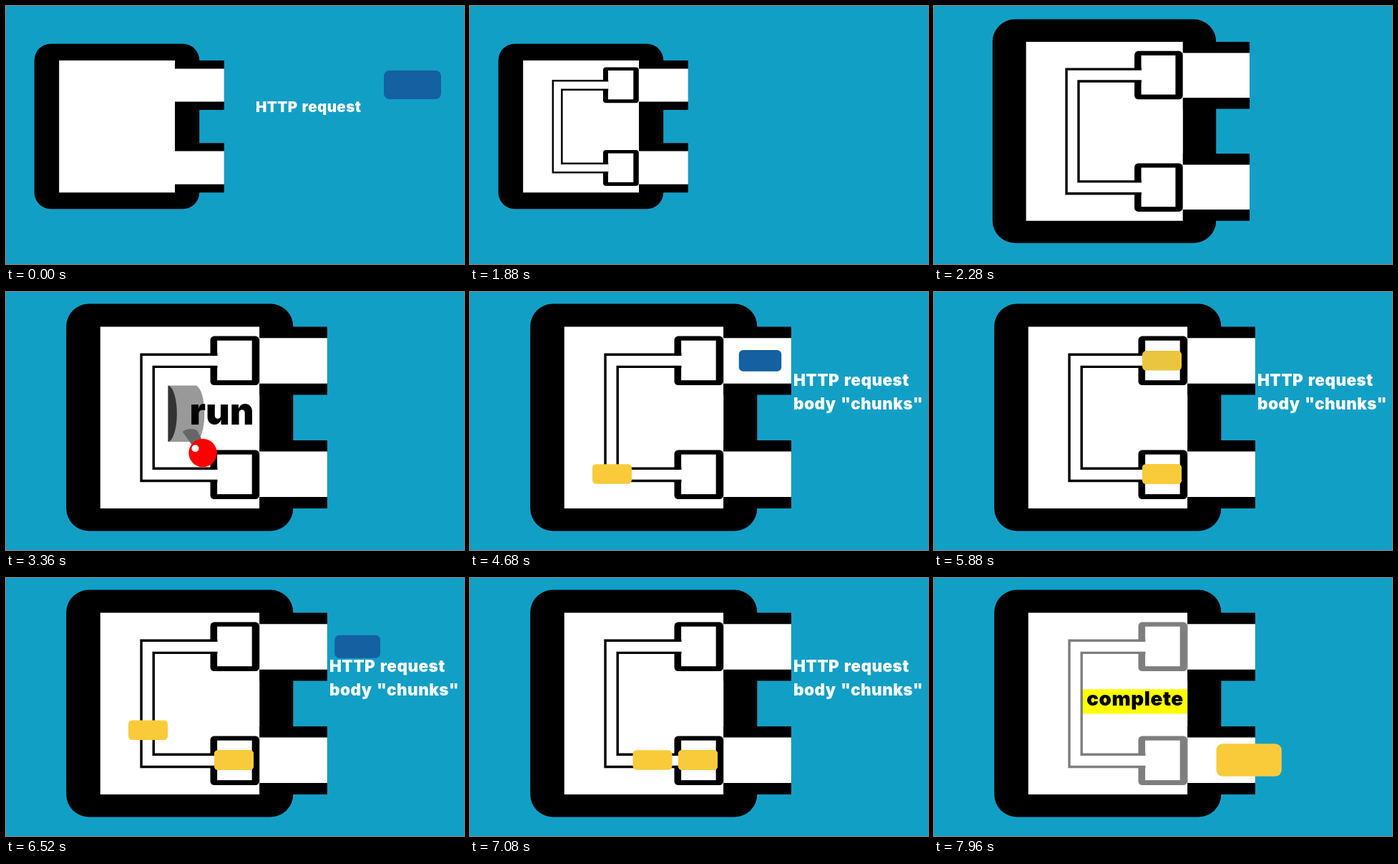
Write an HTML page that moves like this. It is 640 by 360 pixels and loops after 8 s.

```html
<!DOCTYPE html>
<html lang="en">
<head>
<meta charset="utf-8">
<title>HTTP request flow</title>
<style>
  html, body { margin: 0; width: 100%; height: 100%; overflow: hidden; background: #129fc6; }
  svg { display: block; width: 640px; height: 360px; }
  text { font-family: Inter, "Liberation Sans", sans-serif; font-weight: 900; letter-spacing: .02em; }
  .label { fill: #fff; word-spacing: .07em; }
  .mid { text-anchor: middle; }
</style>
</head>
<body>
<svg viewBox="0 0 640 360">
  <defs>
    <g id="socket">
      <rect x="186" y="85.5" width="49.8" height="49.8" rx="4"/>
      <rect x="193" y="90" width="35.3" height="40.3" fill="#fff"/>
    </g>
    <g id="tunnel">
      <path d="M236 76H304.8V145.1H236Z"/>
      <path d="M236 87.4H304.8V133.6H236Z" fill="#fff"/>
    </g>
  </defs>

  <g id="machine">
    <rect x="39.6" y="52.8" width="230.6" height="230.4" rx="23"/>
    <path d="M74.2 76H236V260.3H74.2Z" fill="#fff"/>
    <use href="#tunnel"/>
    <use href="#tunnel" y="115.2"/>
    <g id="plumbing">
      <use id="inlet" href="#socket"/>
      <g id="pipe" fill="none">
        <use href="#socket" y="115.6" fill="#000"/>
        <path d="M193.2 110.4H122.1V226.1H193.2" stroke="#000" stroke-width="15"/>
        <path d="M193.6 110.4H122.1V226.1H193.6" stroke="#fff" stroke-width="10"/>
      </g>
    </g>
  </g>

  <text id="title" class="label mid" x="422.6" y="148" font-size="20.5">HTTP request</text>
  <g id="body" class="label" font-size="22.5">
    <text x="452" y="130.5">HTTP request</text>
    <text x="452" y="163.5">body "chunks"</text>
  </g>

  <g id="lever">
    <path d="M226.5 130.5H265A13 39.3 0 0 1 265 209H226.5Z" fill="#999"/>
    <path d="M226.5 130.5A13 39.3 0 0 1 226.5 209Z" fill="#333"/>
    <text class="mid" x="301.5" y="185" font-size="52" style="letter-spacing:0">run</text>
    <path id="arm" fill="#666"/>
    <g id="ball">
      <circle r="19.7" fill="red"/>
      <circle cx="-10.5" cy="-6.3" r="5" fill="#fff"/>
    </g>
  </g>

  <g id="done">
    <path d="M208 155.3H353.8V189.5H208Z" fill="#ff0"/>
    <text class="mid" x="281" y="178" font-size="27.8">complete</text>
  </g>
  <g id="chunks"></g>
</svg>

<script>
const LOOP = 8000;
const BLUE = [20, 96, 160], YELLOW = [249, 203, 58];
const COUNT = 6, GAP = 470.6;
const ENTER = 349, LEG = 100, CONVERT = 164;
const ROUTE = [[318.5, 95.8], [198.5, 95.8], [198.5, 254], [318.5, 254]];

const el = id => document.getElementById(id);
const mix = (a, b, q) => a + (b - a) * q;
const unit = x => Math.min(1, Math.max(0, x));
const quad = x => (x = unit(x)) < .5 ? 2 * x * x : 1 - 2 * (1 - x) ** 2;
const cubic = x => (x = unit(x)) < .5 ? 4 * x ** 3 : 1 - 4 * (1 - x) ** 3;
const show = (id, on) => { el(id).style.display = on ? '' : 'none'; };
const set = (node, attrs) => { for (const k in attrs) node.setAttribute(k, attrs[k]); };

const rects = Array.from({ length: COUNT + 2 }, () =>
  el('chunks').appendChild(document.createElementNS('http://www.w3.org/2000/svg', 'rect')));
const intro = rects[COUNT], reply = rects[COUNT + 1];

// A chunk is twice as wide as high, placed by its centre.
function place(rect, on, x, y, w, tint = 0) {
  rect.style.display = on ? '' : 'none';
  if (!on) return;
  const rgb = BLUE.map((c, i) => Math.round(mix(c, YELLOW[i], tint)));
  set(rect, { x: x - w / 2, y: y - w / 4, width: w, height: w / 2, rx: w / 10, fill: `rgb(${rgb})` });
}

function drawChunk(k, t) {
  const start = k ? 4435.7 + GAP * (k - 1) : 3825;
  const leave = 4479 + GAP * k;
  const on = t >= start && t < 7640;
  if (t < leave) {
    const q = quad((t - start) / ENTER);
    place(rects[k], on, mix(811, ROUTE[0][0], q), ROUTE[0][1], mix(80, 55, q),
      unit((t - leave + CONVERT) / CONVERT));
    return;
  }
  const d = Math.min(2.9999, (t - leave) / LEG), i = Math.floor(d);
  const [a, b] = [ROUTE[i], ROUTE[i + 1]], q = cubic(d - i);
  place(rects[k], on, mix(a[0], b[0], q), mix(a[1], b[1], q), 55, 1);
}

function drawLever(t) {
  const s = 2 * quad((t - 2880) / 480) - 1;
  const y = 161.6 + 62.9 * s, base = 170 + 25 * s;
  set(el('ball'), { transform: `translate(275 ${y})` });
  set(el('arm'), { d: `M246.5 ${base}Q256 ${base - 7 * s} 267 ${base - 2 * s}L283 ${y}L268 ${y}Z` });
}

function render(t) {
  const z = quad((t - 1880) / 480);
  set(el('machine'), { transform: `translate(${29.75 * z} ${-56 * z}) scale(${1 + .375 * z})` });
  set(el('plumbing'), { opacity: t >= 7640 ? .5 : 1 });
  show('inlet', t >= 480);
  show('pipe', t >= 1880);
  show('title', t < 920);
  show('lever', t >= 2880 && t < 3960);
  show('body', t >= 3800 && t < 7240);
  show('done', t >= 7640);
  drawLever(t);

  for (let k = 0; k < COUNT; k++) drawChunk(k, t);
  place(intro, t < 480, mix(568, 211, quad(t / 440)), 110, 80);
  const q = quad((t - 7640) / 480);
  place(reply, t >= 7640, mix(318.5, 474.3, q), 254, mix(55, 101.5, q), 1);
}

const begin = performance.now();
function tick() {
  render((performance.now() - begin) % LOOP);
  requestAnimationFrame(tick);
}
tick();
</script>
</body>
</html>
```
